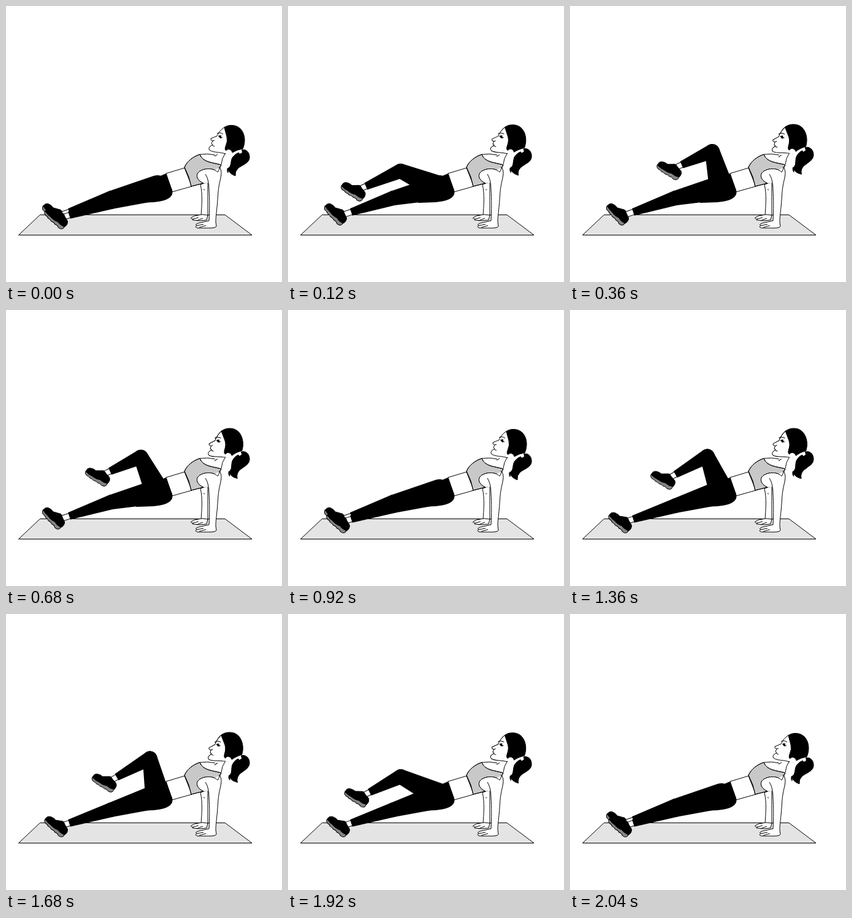
Write an HTML page with a canvas that moves like this. It is 450x450 px and loops after 2440 ms.

```html
<!DOCTYPE html>
<html lang="en">
<head>
<meta charset="utf-8">
<title>Reverse plank knee raise</title>
<style>
html, body { margin: 0; width: 100%; height: 100%; overflow: hidden; background: #fff; }
canvas { display: block; width: 450px; height: 450px; }
</style>
</head>
<body>
<canvas id="stage" width="450" height="450"></canvas>
<script>
const ctx = document.getElementById('stage').getContext('2d');
const LOOP = 2440;
const BLACK = '#000', WHITE = '#fff', BRA = '#c8c8c8', MAT = '#e4e4e4', SOLE = '#858585';

// [start ms, near leg lift, far leg lift]
const steps = [
  [0, 0, 0], [120, .42, 0], [240, .85, 0], [360, 1, 0],
  [560, .97, 0], [680, .89, 0], [800, .45, 0], [920, 0, 0],
  [1120, 0, .14], [1240, 0, .5], [1360, 0, .87], [1480, 0, 1],
  [1680, 0, .95], [1800, 0, .86], [1920, 0, .45], [2040, 0, 0]
];

// Joint positions at rest, halfway and fully raised
const near = {
  hip: [247, 297], tilt: 10, slip: 0,
  knee: [[172, 319], [188, 262], [232, 237]],
  ankle: [[103, 341], [133, 287], [182, 259]]
};
const far = {
  hip: [247, 296], tilt: 15, slip: -4,
  knee: [[172, 313], [187, 261], [242, 234]],
  ankle: [[103, 336], [137, 287], [186, 265]]
};

const shape = d => new Path2D(d);
const art = {
  mat: shape('M55.5 340.5H357L401 373.5H20.5Z'),
  pelvis: shape('M261 273L271 300C274 312 262 318 240 320L212 321L226 288Z'),
  waist: shape('M291 264L261 273L271 303L303 294Z'),
  chest: shape('M316 242Q329 240 341 243L357 241Q352 248 351 258L340 275L316 262Z'),
  bra: shape('M316 242C306 245 295 253 291 263Q299 278 302 294L322 289C313 285 309 278 313 272C320 264 338 263 345 271L351 259C336 255 321 255 316 242Z'),
  armhole: shape('M322 289C313 285 309 278 313 272C320 264 338 263 345 271L346 285L330 288Z'),
  farArm: shape('M317 291C321 308 319 326 318 342H329V287Z'),
  farHand: shape('M319 340L308 342L302 345Q301 348 306 347L304 349L316 350L327 349L329 341Z'),
  nearArm: shape('M345 265Q352 263 351 274C350 285 346 297 346 308C346 325 342 340 342 352L343 359Q342 362 333 362H312Q307 360 311 358Q307 356 314 354L331 350C332 333 332 314 331 300Q331 283 325 274Z'),
  armLine: shape('M347 262Q353 267 350 280C346 297 346 302 345 316C344 332 342 342 342 352L343 359Q342 362 333 362H312Q307 360 311 358Q307 356 314 354L331 350C332 333 332 314 331 300Q331 283 325 274'),
  fingers: shape('M311 358L322 356M315 361L326 358M306 347L314 345M311 350L321 346M322 299L324 300'),
  face: shape('M357 197C349 202 346 208 344 212L334 216Q333 219 337 220L335 224L337 226L334 228Q329 231 332 235C338 239 347 238 354 240L364 242L368 220Z'),
  hair: shape('M356 198C362 193 375 193 382 200C390 208 391 222 386 233Q377 234 369 239Q368 234 362 234L359 236Q356 234 358 229Q362 220 360 213Z'),
  tail: shape('M384 235C391 232 398 239 397 248C396 257 383 260 378 265Q373 270 374 277Q365 274 362 267L362 272Q360 269 361 265C369 262 365 252 370 246Q375 240 380 239Z'),
  tie: shape('M379 237L384 234L385 239L381 241Z'),
  ear: shape('M359 236Q363 232 367 236Q368 243 361 243Q357 242 359 236Z'),
  features: shape('M344 208Q349 205 354 209M346 212L353 215M336 227L340 229M337 220L340 219M340 245L345 242'),
  eye: shape('M347 211L351 211L351 216L348 215Z'),
  sole: shape('M-39 -1Q-42 3 -38 7Q-34 8 -33 11Q-29 12 -27 15Q-22 16 -20 19Q-16 19 -14 23Q-9 26 -6 23L-3 17L-20 11L-36 -2Z'),
  shoe: shape('M-39 1Q-38 -6 -31 -5Q-26 -4 -23 -1L-14 -1Q-9 -2 -7 3L-1 10Q1 15 -4 20Q-11 19 -16 14Q-23 13 -29 8Q-34 6 -39 1Z')
};

function paint(path, fill, line = BLACK) {
  if (fill) { ctx.fillStyle = fill; ctx.fill(path); }
  if (line) { ctx.strokeStyle = line; ctx.stroke(path); }
}

// Quadratic through the three key positions
function along([a, b, c], u) {
  const wa = (1 - u) * (1 - 2 * u), wb = 4 * u * (1 - u), wc = u * (2 * u - 1);
  return [0, 1].map(i => a[i] * wa + b[i] * wb + c[i] * wc);
}

// Tapered limb between two joints with radii ra and rb
function limb([ax, ay], [bx, by], ra, rb, color, roundEnd) {
  const dir = Math.atan2(by - ay, bx - ax);
  const spread = Math.acos((ra - rb) / Math.hypot(bx - ax, by - ay));
  ctx.beginPath();
  ctx.arc(ax, ay, ra, dir + spread, dir - spread + Math.PI * 2);
  if (roundEnd) {
    ctx.arc(bx, by, rb, dir - spread, dir + spread);
  } else {
    ctx.lineTo(bx + rb * Math.sin(dir), by - rb * Math.cos(dir));
    ctx.lineTo(bx - rb * Math.sin(dir), by + rb * Math.cos(dir));
  }
  ctx.closePath();
  ctx.fillStyle = color;
  ctx.fill();
}

function drawLeg(leg, u) {
  const knee = along(leg.knee, u), ankle = along(leg.ankle, u);
  const rest = Math.max(0, 1 - 2 * u);
  const footX = ankle[0] + leg.slip * rest;

  const dir = Math.atan2(ankle[1] - knee[1], ankle[0] - knee[0]);
  ctx.save();
  ctx.translate(...ankle);
  ctx.rotate(dir);
  ctx.fillStyle = WHITE;
  ctx.fillRect(-2, -4.5, 17, 9);
  ctx.strokeStyle = BLACK;
  ctx.beginPath();
  for (const y of [-4.5, 4.5]) { ctx.moveTo(-2, y); ctx.lineTo(15, y); }
  ctx.stroke();
  ctx.restore();

  ctx.save();
  ctx.translate(footX, ankle[1]);
  ctx.rotate(leg.tilt * rest * Math.PI / 180);
  paint(art.sole, SOLE);
  paint(art.shoe, BLACK);
  ctx.restore();

  limb(leg.hip, knee, 20, 12, BLACK, true);
  limb(knee, ankle, 12, 6, BLACK, false);
}

function drawHead(lift) {
  ctx.save();
  ctx.translate(352, 245);
  ctx.rotate(-6.5 * lift * Math.PI / 180);
  ctx.translate(-352, -245);
  paint(art.face, WHITE);
  paint(art.hair, BLACK);
  paint(art.tail, BLACK);
  paint(art.tie, WHITE, null);
  paint(art.ear, WHITE, null);
  paint(art.features);
  paint(art.eye, BLACK, null);
  ctx.restore();
}

function draw(time) {
  const [, nearLift, farLift] = steps.findLast(s => s[0] <= time);
  ctx.fillStyle = WHITE;
  ctx.fillRect(0, 0, 450, 450);
  ctx.lineWidth = 1;
  ctx.lineJoin = 'round';

  paint(art.mat, MAT);
  drawLeg(far, farLift);
  paint(art.farArm, WHITE);
  paint(art.farHand, WHITE);
  paint(art.waist, WHITE);
  paint(art.chest, WHITE, null);
  paint(shape('M316 242Q329 240 341 243M357 241Q352 248 351 258'));
  paint(art.bra, BRA);
  paint(art.armhole, WHITE, null);
  paint(art.nearArm, WHITE, null);
  paint(art.bra);
  paint(art.armLine);
  paint(art.fingers);
  paint(art.pelvis, BLACK, null);
  drawLeg(near, nearLift);
  drawHead(Math.max(nearLift, farLift));
}

const start = performance.now();
function tick() {
  draw((performance.now() - start) % LOOP);
  requestAnimationFrame(tick);
}
tick();
</script>
</body>
</html>
```
